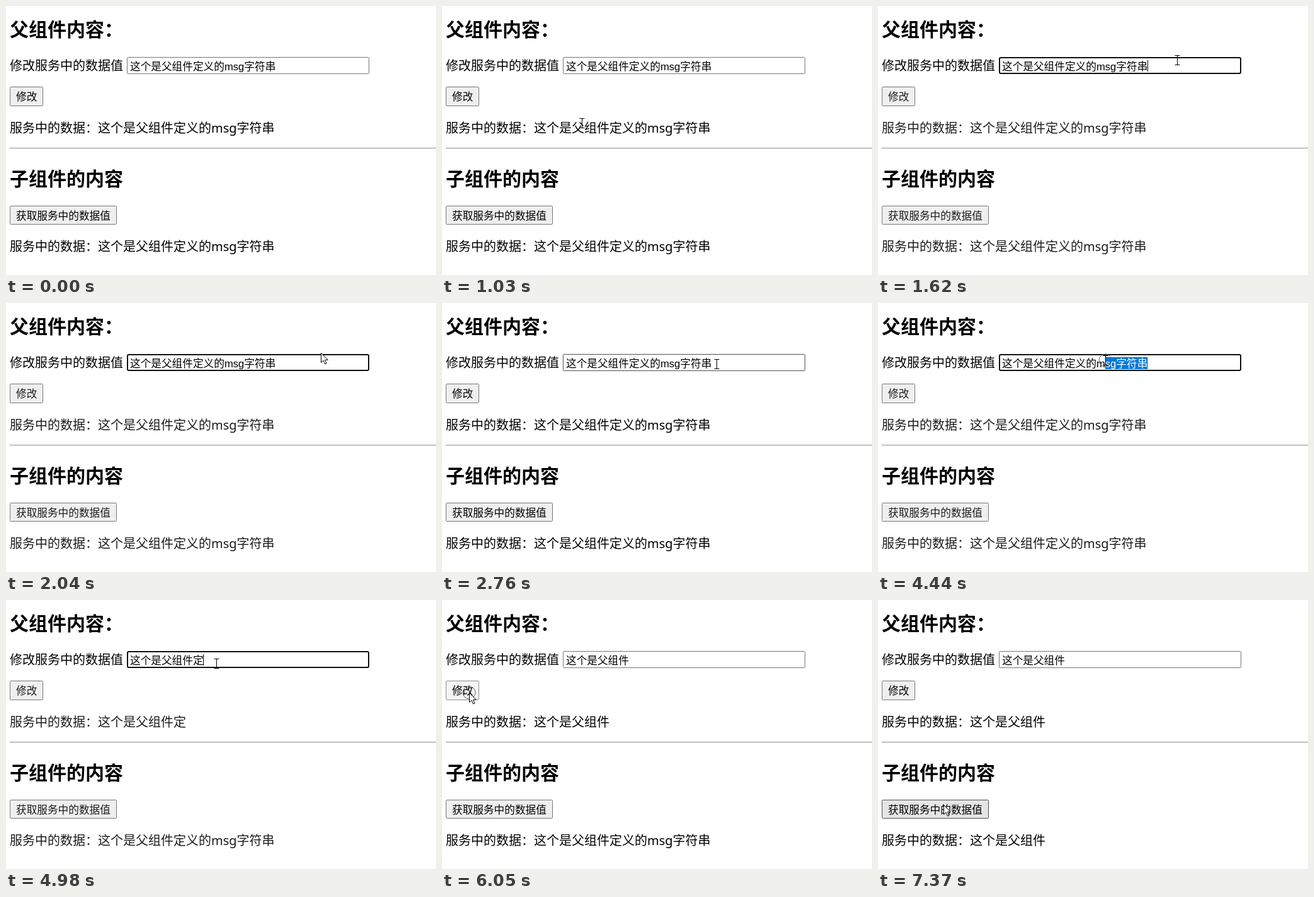
These frames come from a looping animation (683 by 427 pixels, 8000 ms). An HTML page:

```html
<!DOCTYPE html>
<html lang="zh-CN">
<head>
<meta charset="utf-8">
<style>
  html, body { margin: 0; width: 100%; height: 100%; overflow: hidden; background: #fff; }
  svg { display: block; width: 683px; height: 427px; }
  text { font: 350 20px 'Noto Sans', 'Noto Sans CJK SC', 'Noto Sans CJK', sans-serif; white-space: pre; }
  .title { font-size: 30px; font-weight: 700; }
  .control { font: 350 16.667px 'Liberation Sans', 'Noto Sans CJK SC', 'Noto Sans CJK', sans-serif; }
  .soft .body { fill: #1c1c1c; }
  .box { fill: #efefef; stroke: #767676; }
  .box.hover { fill: #e5e5e5; stroke: #4f4f4f; }
  .box.active { fill: #f5f5f5; stroke: #8d8d8d; }
  #field { fill: #fff; }
  #field.focus { stroke: #101010; stroke-width: 2px; }
</style>
</head>
<body>
<svg id="stage" viewBox="0 0 683 427">
  <text class="title" x="6" y="48">父组件内容：</text>
  <text x="6" y="101.5">修改服务中的数据值</text>
  <rect id="field" class="box"/>
  <rect id="selection" y="86" height="19" fill="#0078d7"/>
  <text id="value" class="control" x="197" y="101.5"><tspan id="plain"></tspan><tspan id="marked" fill="#fff"></tspan></text>
  <rect id="caret" y="86" width="1" height="18"/>
  <rect id="save" class="box"/>
  <text class="control body" x="16" y="150">修改</text>
  <text id="parentText" class="body" x="6" y="200.5"></text>
  <path d="M6 225.5H683" stroke="#9a9a9a"/>
  <path d="M6 226.5H683" stroke="#eee"/>
  <text class="title" x="6" y="285">子组件的内容</text>
  <rect id="load" class="box"/>
  <text class="control body" x="16" y="339">获取服务中的数据值</text>
  <text id="childText" class="body" x="6" y="388.5"></text>
  <g id="pointer">
    <circle id="ring" r="10" fill="none" stroke="#666"/>
    <path id="arrow" d="M.5 .5V15.5L4 12.2L6.6 18L9 17L6.5 11.3H11.2Z" fill="#fff" stroke="#000"/>
    <path id="beam" d="M-3.5 -7.5H4.5M.5 -7.5V7.5M-3.5 7.5H4.5" fill="none" stroke="#000"/>
  </g>
</svg>
<script>
const LOOP = 8000;
const TICK = 80;
const HOLD = 90;
const TEXT_X = 197;
const FULL = '这个是父组件定义的msg字符串';
const PREFIX = '服务中的数据：';

const CLICKS = [1460, 2100, 2840, 6050, 7270];
const DRAG = { down: 4010, up: 4740 };
const CUT = 4900, BACKSPACE = 5240;
const LOADED = 7270 + HOLD;
const DOWNS = [...CLICKS, DRAG.down].sort((a, b) => a - b);

const move = (from, to, x, y) => ({ from, to, x, y });
const MOVES = [
  move(380, 540, 61, 247),
  move(770, CLICKS[0], 464, 94),
  move(1540, 1620, 475, 86),
  move(1700, CLICKS[1], 505, 78),
  move(2180, 2760, 436, 97),
  move(CLICKS[2], 3220, 452, 92),
  move(DRAG.down, 4670, 315, 90),
  move(CUT, 5060, 344, 107),
  move(BACKSPACE, 5970, 43, 147),
  move(6450, 7010, 104, 325)
];

const area = (x, y, width, height) => ({ x, y, width, height });
const FIELD = area(192, 81, 385, 27);
const SAVE = area(6, 128, 53, 31);
const LOAD = area(6, 317, 170, 30);
const TEXT_AREAS = [FIELD, area(6, 84, 180, 21), area(6, 182, 420, 24), area(6, 256, 180, 35)];

const $ = id => document.getElementById(id);
const latest = (times, t) => times.filter(time => time <= t).pop();
const show = (el, on) => { el.style.visibility = on ? 'visible' : 'hidden'; };
const inside = (a, p) =>
  p.x >= a.x && p.x < a.x + a.width && p.y >= a.y && p.y < a.y + a.height;
const setAttrs = (el, attrs) => {
  for (const key in attrs) el.setAttribute(key, attrs[key]);
};

// Outlines lie inside the area, half a line from its edge.
function frame(el, a, line = 1) {
  setAttrs(el, {
    x: a.x + line / 2, y: a.y + line / 2,
    width: a.width - line, height: a.height - line, rx: line
  });
}

// The pointer travels in equal jumps, the first one right at the start.
function pointerAt(t) {
  let p = { x: 422, y: 490 };
  for (const { from, to, x, y } of MOVES) {
    if (t < from) break;
    const gaps = Math.round((to - from) / TICK);
    const gap = Math.min(gaps, Math.floor((t - from) / (to - from) * gaps + 0.01));
    const k = (gap + 1) / (gaps + 1);
    p = { x: p.x + (x - p.x) * k, y: p.y + (y - p.y) * k };
  }
  return { x: Math.round(p.x), y: Math.round(p.y) };
}

function isFocused(t) {
  const down = latest(DOWNS, t);
  return down !== undefined && inside(FIELD, pointerAt(down));
}

function paintButton(el, a, p, pressed) {
  const over = inside(a, p);
  el.classList.toggle('hover', over && !pressed);
  el.classList.toggle('active', over && pressed);
}

function paintField(t, p, focused) {
  const value = FULL.slice(0, t < CUT ? FULL.length : t < BACKSPACE ? 7 : 6);
  const edge = n => TEXT_X + (n ? $('value').getSubStringLength(0, n) : 0);
  $('plain').textContent = value;
  $('marked').textContent = '';

  let cut = value.length;
  if (t >= DRAG.down && t < CUT) {
    // the selection edge snaps to the nearest character boundary
    while (cut > 0 && (edge(cut) + edge(cut - 1)) / 2 > p.x) cut--;
  }
  const left = edge(cut), right = edge(value.length);
  $('plain').textContent = value.slice(0, cut);
  $('marked').textContent = value.slice(cut);
  setAttrs($('selection'), { x: left, width: right - left });

  const woken = latest([...DOWNS, CUT, BACKSPACE].sort((a, b) => a - b), t);
  $('caret').setAttribute('x', Math.floor(right));
  show($('caret'), focused && cut === value.length && (t - woken) % 1000 < 500);

  $('field').classList.toggle('focus', focused);
  $('field').classList.toggle('hover', inside(FIELD, p));
  frame($('field'), FIELD, focused ? 2 : 1);
  $('parentText').textContent = PREFIX + value;
  $('childText').textContent = PREFIX + (t < LOADED ? FULL : value);
}

function render(t) {
  const p = pointerAt(t);
  const visible = t >= MOVES[0].from;
  const pressed = t >= DRAG.down && t < DRAG.up
    || CLICKS.some(down => t >= down && t < down + HOLD);
  const focused = isFocused(t);
  const beam = TEXT_AREAS.some(a => inside(a, p));

  $('stage').classList.toggle('soft', focused);
  paintField(t, p, focused);
  paintButton($('save'), SAVE, p, pressed);
  paintButton($('load'), LOAD, p, pressed);
  $('pointer').setAttribute('transform', `translate(${p.x} ${p.y})`);
  show($('ring'), visible && pressed);
  show($('beam'), visible && beam);
  show($('arrow'), visible && !beam);
}

frame($('save'), SAVE);
frame($('load'), LOAD);
const began = performance.now();
function tick() {
  render((performance.now() - began) % LOOP);
  requestAnimationFrame(tick);
}
tick();
</script>
</body>
</html>
```
